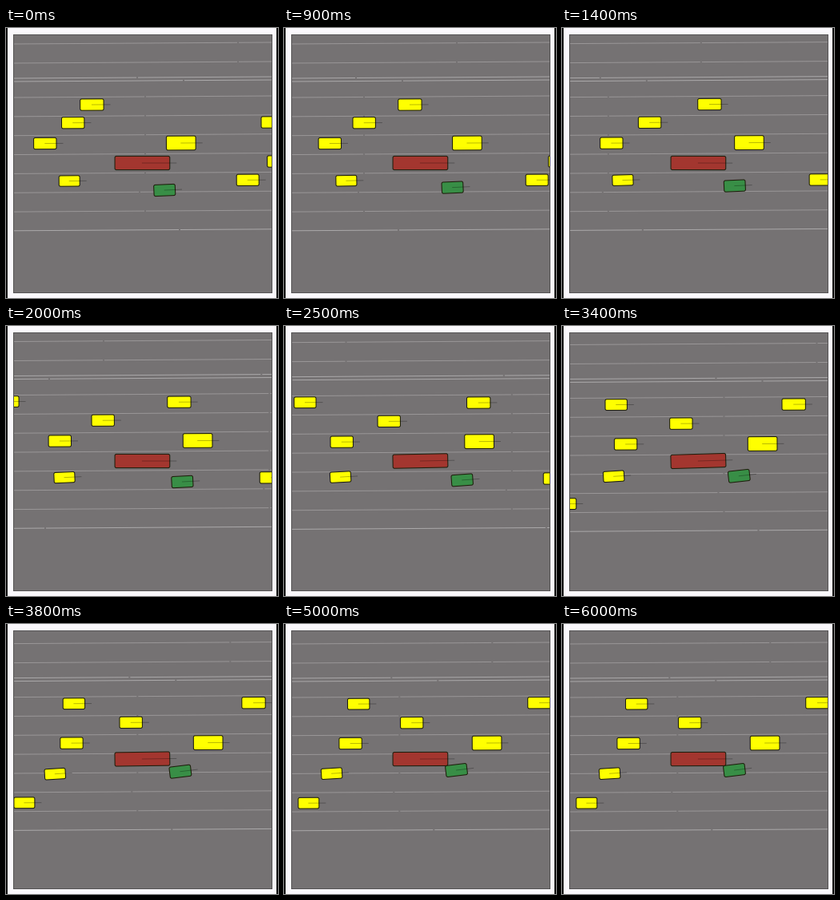
These frames come from a looping animation (340x338 px, 6.1 s). A matplotlib script:

```python
import numpy as np
import matplotlib.pyplot as plt
from matplotlib.animation import FuncAnimation
from matplotlib.patches import FancyBboxPatch, Rectangle
from matplotlib.transforms import Affine2D

W, H, DPI = 340, 338, 64
PX = 72 / DPI  # one pixel in points
LEFT, RIGHT, TOP, BOTTOM = 9, 332.3, 8.3, 330.7
STEPS, STOP = 61, 40  # everything halts at the crash
KEYS = np.array([0, 9, 20, 30, 38, 40])

ROAD, MARK, BRIGHT = "#757273", "#9a9798", "#aba9aa"
YELLOW, RED, GREEN = "#ffff00", "#a3362f", "#388e46"


def track(values):
    """Smooth curve through one value per key time."""
    v = np.array(values, float)
    slope = np.gradient(v, KEYS)

    def at(t):
        k = min(np.searchsorted(KEYS, t, side="right") - 1, len(KEYS) - 2)
        h = KEYS[k + 1] - KEYS[k]
        u = (t - KEYS[k]) / h
        return ((1 + 2 * u) * (1 - u) ** 2 * v[k] + u * (1 - u) ** 2 * h * slope[k]
                + u * u * (3 - 2 * u) * v[k + 1] + u * u * (u - 1) * h * slope[k + 1])

    return at


def still(value):
    return lambda t: value


drift = track([0, 0, -0.5, 2.2, 4.6, 5])
scroll = track([0, -74, -168, -258, -333, -353])


def in_lane(y):
    return lambda t: y + drift(t)


fig = plt.figure(figsize=(W / DPI, H / DPI), dpi=DPI, facecolor="#faf8fc")
for x in (0, W - 2):
    fig.add_artist(Rectangle((x / W, 0), 2 / W, 1, fc="#111111", ec="none"))

ax = fig.add_axes([LEFT / W, 1 - BOTTOM / H, (RIGHT - LEFT) / W, (BOTTOM - TOP) / H],
                  facecolor=ROAD)
ax.set(xlim=(LEFT, RIGHT), ylim=(BOTTOM, TOP), xticks=[], yticks=[])
for spine in ax.spines.values():
    spine.set(linewidth=PX, color="#555354")


class Lane:
    def __init__(self, y, seam, color=MARK):
        self.y, self.seam = y, seam
        self.line, = ax.plot([], [], color=color, lw=PX, zorder=1)

    def update(self, t):
        span = RIGHT - LEFT
        gap = LEFT + (self.seam + scroll(t) - LEFT) % span
        x = np.array([LEFT, gap - 1.5, np.nan, gap + 1.5, RIGHT])
        y = self.y + drift(t) - 2 * (x - LEFT) / span
        self.line.set_data(x, y)
        self.line.set_snap(False)


class Car:
    def __init__(self, size, x, y, angle=still(0.3), color=YELLOW):
        w, h = size
        self.x, self.y, self.angle = x, y, angle
        self.body = FancyBboxPatch((-w / 2, -h / 2), w, h, fc=color, ec="#1e1e0c",
                                   boxstyle="round,pad=0,rounding_size=2",
                                   lw=1.05 * PX, snap=False, zorder=2)
        ax.add_patch(self.body)
        self.aim, = ax.plot([0, w / 2 + 8], [0, 0], color="black", alpha=0.3,
                            lw=0.9 * PX, snap=False, zorder=2.1,
                            scalex=False, scaley=False)

    def update(self, t):
        place = Affine2D().rotate_deg(-self.angle(t)).translate(self.x(t), self.y(t))
        for part in (self.body, self.aim):
            part.set_transform(place + ax.transData)


lanes = [Lane(20, 290), Lane(44, 290), Lane(63, 164, BRIGHT), Lane(67, 222, BRIGHT)]
lanes += [Lane(87 + 23.85 * i, 167 if i == 5 else 174) for i in range(7)]
lanes.append(Lane(253.8, 217, BRIGHT))

cars = [
    Car((29.4, 14.3), track([107.4, 157.4, 216.4, 269.5, 309.5, 319.4]),
        track([96, 96, 95.2, 97.2, 98.7, 98.7])),
    Car((28.4, 14.3), track([83.7, 100.2, 121.2, 141.2, 156.2, 159.7]), in_lane(118.7)),
    Car((28.4, 14.3), track([48.8, 57.3, 67.3, 76.8, 82, 83.1]), in_lane(144.5)),
    Car((26, 13.3), track([79.2, 77.9, 73, 67.7, 61.3, 59.6]),
        track([191.5, 191.2, 189.6, 188.6, 187.7, 187.2]),
        track([0.5, 1, 2.5, 3.5, 3.5, 3.5])),
    Car((36.7, 17.7), track([218.8, 228.9, 239.6, 248.1, 252.7, 253.6]), in_lane(144)),
    Car((28, 14.3), track([302.2, 316.2, 331.2, 345.2, 356, 359]), in_lane(190.3)),
    Car((28, 14.3), track([333, 375, 428, 478, 518, 528]), in_lane(118)),
    Car((28, 14.3), track([340.5, 344.5, 350, 356, 361, 362]), in_lane(167)),
    Car((27.4, 13.8), track([-95, -50, 2.4, 49.8, 84.9, 93.2]), in_lane(95.1)),
    Car((26, 13.8), track([-140, -100, -56, -14, 22.9, 30.8]), in_lane(219.2)),
    Car((68.7, 17.2), still(170.4), still(169),
        track([0, 0, 0, 2, 0.8, 0.2]), RED),
    Car((26.7, 14.2), track([198.2, 210.6, 220.4, 223, 217.9, 215.5]),
        track([203, 199.6, 195, 190.4, 184.7, 183]),
        track([2.5, 2.5, 3, 5.5, 7, 7]), GREEN),
]


def draw(step):
    t = min(step, STOP)
    for item in lanes + cars:
        item.update(t)


anim = FuncAnimation(fig, draw, frames=STEPS, interval=100, repeat=True, repeat_delay=0)
plt.show()
```
